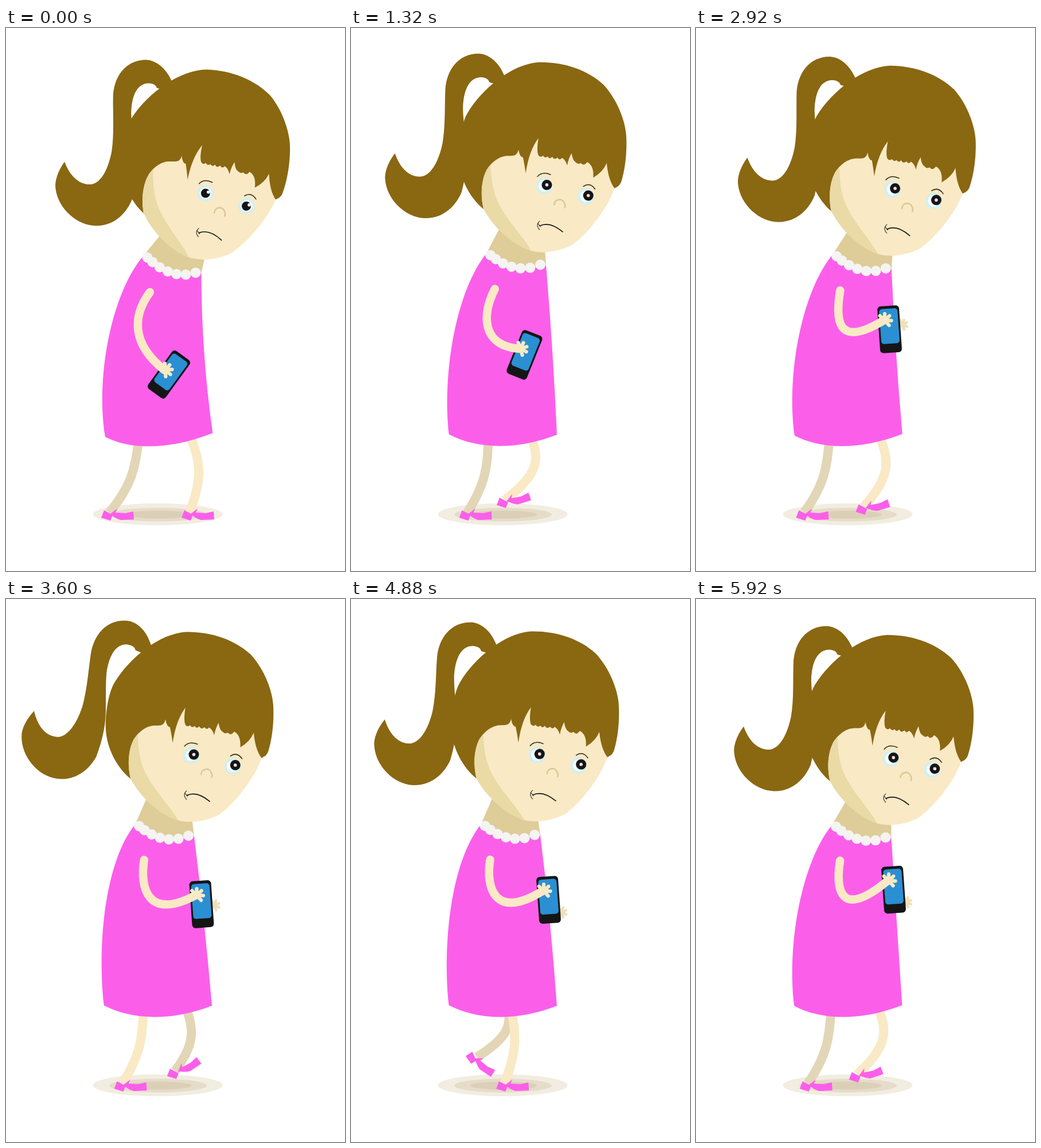
An HTML page with a canvas that plays this animation: 591x948 px, repeating every 5960 ms.

```html
<!DOCTYPE html>
<html lang="en">
<head>
<meta charset="utf-8">
<title>Walking girl with phone</title>
<style>
  html, body { margin: 0; width: 100%; height: 100%; overflow: hidden; background: #fff; }
  canvas { display: block; }
</style>
</head>
<body>
<canvas id="stage" width="591" height="948"></canvas>
<script>
const ctx = document.getElementById('stage').getContext('2d');
const LOOP = 5960, TICK = 40, CYCLE = 1520;
const SKIN = '#f9e9c5', SHADE = '#e2d6b6', PINK = '#fb5fea', HAIR = '#8a6711', INK = '#151515';
const RAD = Math.PI / 180;

// Head shapes, drawn in the pose where the head leans furthest forward
const TAIL = new Path2D('M289 88C278 66 260 55 245 55C210 56 189 85 189 122C189 150 192 185 188 215C182 250 168 274 150 274C130 274 115 258 106 235C94 252 89 270 91 282C96 318 130 346 162 346C195 346 216 322 225 298C231 270 233 245 230 220C227 195 222 170 221 150C221 115 232 97 250 96C260 96 264 100 265 104L300 112Z');
const HAIRCAP = new Path2D('M240 322C224 308 202 275 202 233C203 200 212 168 222 153C250 112 305 72 352 72C395 74 435 90 462 118C485 146 496 185 496 208C496 245 488 275 482 290C477 299 472 298 470 300L360 330Z');
const FACE = new Path2D('M240 322C236 300 238 272 250 253C260 240 272 233 282 232C295 231 303 236 307 222C308 232 311 236 314 236Q316 250 317 264Q325 225 343 204Q338 225 341 234q4 5 8 1q3 6 8 2q3 6 8 1q3 7 9 2q3 6 8 1Q388 245 390 255Q393 243 399 234Q400 247 405 250q4 5 9 2q5 7 11-1Q437 258 434 279Q452 270 459 255Q460 285 470 300C455 335 420 375 390 394C365 405 335 407 314 398C285 385 255 355 240 322Z');
const CHEEK = new Path2D('M240 322C236 300 238 272 250 253L257 245C256 270 258 295 267 315C281 347 303 370 318 399L314 398C285 385 255 355 240 322Z');
const NOSE = new Path2D('M363 322C364 312 378 310 381 320Q383 325 381 328');
const BROWS = new Path2D('M337 271Q346 262 360 269M416 293Q428 286 436 299');
const FROWN = new Path2D('M336 357Q354 350 375 370');
const DIMPLE = new Path2D('M336 349Q328 355 335 364M333 353L337 359');
const YELL = new Path2D('M333 354C333 346 337 341 343 342C350 343 350 352 357 353C365 353 376 354 376 359C376 364 373 370 367 369C361 368 360 361 354 362C350 364 346 368 340 366C335 364 333 359 333 354Z');
const HEEL = new Path2D('M-9 1L-14 14L2 19L6 9Z');
const TOE = new Path2D('M1 8L14-2L11 5L28 6L42 3L43 17L20 18Q12 16 5 10Z');

// How each leg differs: swing lag, forward reach, toe lift
const FAR = { color: SHADE, lag: 14, reach: 25, toe: 34 };
const NEAR = { color: SKIN, lag: 40, reach: 0, toe: 16 };

// Arm poses: hand, handles at shoulder and hand, phone offset, phone tilt
const FRONT = [276, 597, -31, 42, -57, -45, 8, 8, 36];
const BACK = [190, 577, -73, 14, -30, -50, 9, 5, 35];

const mix = (a, b, k) => a + (b - a) * k;
const blend = (a, b, k) => a.map((v, i) => mix(v, b[i], k));
const clamp = v => Math.max(0, Math.min(1, v));
const ramp = (t, from, length) => {
  const k = clamp((t - from) / length);
  return k * k * (3 - 2 * k);
};
const wave = (t, peak, period = CYCLE) => Math.cos(2 * Math.PI * (t - peak) / period);
const arch = k => Math.sin(Math.PI * clamp(k));

function at(x, y, deg, draw) {
  ctx.save();
  ctx.translate(x, y);
  ctx.rotate(deg * RAD);
  draw();
  ctx.restore();
}

function fill(path, color) {
  ctx.fillStyle = color;
  ctx.fill(path);
}

function line(path, color, width, cap = 'round') {
  ctx.strokeStyle = color;
  ctx.lineWidth = width;
  ctx.lineCap = cap;
  ctx.stroke(path);
}

function oval(x, y, rx, ry, color) {
  const p = new Path2D();
  p.ellipse(x, y, rx, ry, 0, 0, 7);
  fill(p, color);
}
const dot = (x, y, r, color) => oval(x, y, r, r, color);

function box(x, y, w, h, r, color) {
  const p = new Path2D();
  p.roundRect(x, y, w, h, r);
  fill(p, color);
}

// The foot swings forward in the first half of the cycle and stands in the second
function leg(time, { color, lag, reach, toe }) {
  const t = (time + CYCLE) % CYCLE;
  const k = clamp(2 * t / CYCLE);
  const stride = -wave(t, 0);
  const hip = 277 - 46 * wave(t, -50);
  const knee = hip + 6 - 13 * wave(t, 20);
  const x = 250 + 70 * stride - lag * arch(k) + reach * Math.max(0, stride) ** 3;
  const y = 841 - 46 * arch(k ** .8) ** 1.6;
  const heel = 40 * arch(k / .66);
  const tip = heel - toe * arch((k - .58) / .42);
  line(new Path2D(`M${hip} 716C${knee} ${mix(718, y, .34)} ${knee} ${mix(718, y, .6)} ${x} ${y + 5}`), color, 16, 'butt');
  at(x, y, heel, () => fill(HEEL, PINK));
  at(x, y, tip, () => fill(TOE, PINK));
}

function hand(x, y, deg, color, size) {
  at(x, y, deg, () => {
    ctx.scale(size, size);
    dot(0, 0, 6, color);
    for (let i = -3; i < 2; i++) {
      const a = (46 * i + 2) * RAD;
      line(new Path2D(`M0 0L${Math.cos(a) * 10.5} ${Math.sin(a) * 10.5}`), color, 5.6);
    }
  });
}

function body(c1, c2, nose) {
  const L = [232.5 + 4 * c2 + 5.5 * c1, 395 + 3 * c2];
  const R = [335 + 2 * c2 + 6 * c1, 419 + 10 * c2];
  const hl = [171.5 + 1.5 * c2, 711 + 3 * c2], hr = [359.5 + c2, 709 - 2 * c2];
  const mid = `${mix(L[0], R[0], .45)} ${mix(L[1], R[1], .45) + 26}`;
  const bulge = -1 - 6 * c2;
  const side = k => `${mix(hr[0], R[0], k) + bulge} ${mix(hr[1], R[1], k)}`;

  fill(new Path2D(`M${nose.x - 103} ${nose.y + 40}L${L}Q${mid} ${R}L${nose.x - 26} ${nose.y + 78}Z`), '#decc99');
  fill(new Path2D(`M${L}C${L[0] - 52} 458 ${hl[0] - 14 - 4 * c2} 600 ${hl}C${hl[0] + 42} ${hl[1] + 22} ${hr[0] - 80} ${hr[1] + 31} ${hr}C${side(1 / 3)} ${side(2 / 3)} ${R}Q${mid} ${L}Z`), PINK);
  for (let i = 0; i < 7; i++) {
    const u = (i / 6) ** 1.25;
    dot(mix(L[0] + 7, R[0] - 10, u), mix(L[1] + 3, R[1] - 1, u) + 54 * u * (1 - u), 9, '#f5f4f3');
  }
}

function eye(x, y, ahead, lid) {
  const ball = ctx.createRadialGradient(x + 1, y - 1, 0, x, y, 14);
  ball.addColorStop(.6, '#fff');
  ball.addColorStop(.85, '#c6f1f9');
  ball.addColorStop(1, '#cff1f3');
  dot(x, y, 14, ball);
  if (ahead) {
    dot(x + 4.5, y - 1.5, 9, INK);
    dot(x + 4.5, y - 1.5, 2.8, '#f3dfe0');
  } else {
    dot(x, y, 8, INK);
    dot(x + 5, y - 2, 2.8, '#fff');
  }
  if (lid > 0) {
    at(x, y, 18, () => {
      box(-17, -17, 34, 16 * lid, 0, SKIN);
      box(-17, 17 - 9 * lid, 34, 9 * lid, 0, SKIN);
      line(new Path2D(`M-9 ${-17 + 16 * lid}H9`), INK, 1.5);
    });
  }
}

function head(t, c2, nose) {
  const turn = -2.5 + 2.2 * c2;
  const swing = 5.5 - 4.7 * wave(t, 10);
  const sigh = ramp(t, 320, 160) - ramp(t, 960, 160);
  at(nose.x, nose.y, turn, () => {
    ctx.translate(-373, -320);
    at(289, 88, swing - turn, () => {
      ctx.translate(-289, -88);
      fill(TAIL, HAIR);
    });
    fill(HAIRCAP, HAIR);
    fill(FACE, SKIN);
    fill(CHEEK, '#e9daa6');
    const ahead = t > 1000;
    eye(348, 288, ahead, sigh);
    eye(419, 311, ahead, sigh);
    line(BROWS, '#2b2418', 1.5);
    line(NOSE, '#d9c896', 2.5);
    if (sigh > .4) {
      fill(YELL, INK);
    } else {
      line(FROWN, INK, 1.7);
      line(DIMPLE, INK, 1);
    }
  });
}

function phone(x, y, tilt) {
  at(x, y, tilt, () => {
    box(-19, -41, 38, 82, 6, INK);
    box(-16, -36, 32, 61, 5, '#2a8fd3');
  });
}

// The hanging arm swings back and forth, then lifts the phone and drifts with it
function armPose(t) {
  const hang = blend(FRONT, BACK, .5 - .5 * wave(t, 0, 1360));
  const x = 327 + 7 * ramp(t, 2900, 1400);
  const y = 492 + 26 * arch((t - 1950) / 3850);
  return blend(hang, [x, y, -8, 50, -83, 561 - y, 10.5, 15.5, -4], ramp(t, 1160, 400));
}

function draw(t) {
  const c1 = -wave(t, 540), c2 = wave(t, 50, CYCLE / 2);
  const nose = { x: 361 + 8.5 * c2 + 7 * c1, y: 309.9 + 10.6 * c2 + 1.2 * c1 };
  const [hx, hy, ax, ay, bx, by, px, py, tilt] = armPose(t);
  const sx = 246.5 + 1.5 * c2 + 5 * c1, sy = 457.5 + 4 * c2;

  ctx.fillStyle = '#fff';
  ctx.fillRect(0, 0, 591, 948);
  oval(264.5, 849, 113, 19, '#f2ede1');
  oval(265, 849.5, 85, 12, '#e5dcc9');
  oval(266, 849.5, 58, 7, '#dbd0b7');

  leg(t % CYCLE, FAR);
  leg(t % CYCLE - CYCLE / 2, NEAR);
  if (t >= 1480) hand(hx + px + 22, hy + py + mix(-8, 22, ramp(t, 2900, 1800)), 20, '#efe0ba', .85);
  body(c1, c2, nose);
  head(t, c2, nose);

  phone(hx + px, hy + py, tilt);
  line(new Path2D(`M${sx} ${sy}C${sx + ax} ${sy + ay} ${hx + bx} ${hy + by} ${hx} ${hy}`), SKIN, 14.5);
  hand(hx + 2, hy, tilt + 4, SKIN, 1.1);
}

const start = performance.now();
function frame() {
  const t = (performance.now() - start) % LOOP;
  draw(Math.floor(t / TICK) * TICK);
  requestAnimationFrame(frame);
}
frame();
</script>
</body>
</html>
```
